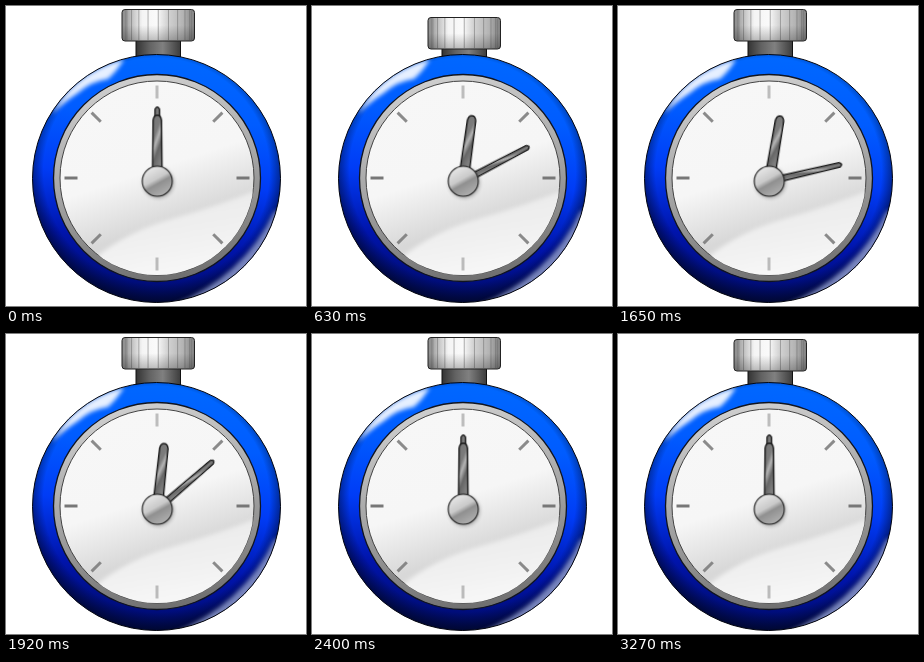
An HTML page for the animation above (3.3 s loop, 300x300 px).

```html
<!DOCTYPE html>
<html lang="en">
<head>
<meta charset="utf-8">
<title>Stopwatch</title>
<style>
  html, body { margin: 0; width: 100%; height: 100%; overflow: hidden; background: #fff; }
  svg { display: block; width: 100vw; height: 100vh; }
</style>
</head>
<body>
<svg viewBox="0 0 300 300">
  <defs>
    <linearGradient id="capMetal">
      <stop offset="0" stop-color="#8a8a8a"/>
      <stop offset=".14" stop-color="#c2c2c2"/>
      <stop offset=".28" stop-color="#f4f4f4"/>
      <stop offset=".48" stop-color="#fafafa"/>
      <stop offset=".62" stop-color="#d4d4d4"/>
      <stop offset=".84" stop-color="#b4b4b4"/>
      <stop offset="1" stop-color="#808080"/>
    </linearGradient>
    <linearGradient id="capShade" x2="0" y2="1">
      <stop offset=".5" stop-color="#000" stop-opacity="0"/>
      <stop offset="1" stop-color="#000" stop-opacity=".25"/>
    </linearGradient>
    <linearGradient id="neckMetal">
      <stop offset="0" stop-color="#333"/>
      <stop offset=".3" stop-color="#626262"/>
      <stop offset=".6" stop-color="#808080"/>
      <stop offset="1" stop-color="#3c3c3c"/>
    </linearGradient>
    <linearGradient id="blue" x1=".55" y1="0" x2=".45" y2="1">
      <stop offset="0" stop-color="#0068ff"/>
      <stop offset=".25" stop-color="#005cff"/>
      <stop offset=".5" stop-color="#003cf6"/>
      <stop offset=".75" stop-color="#0014ac"/>
      <stop offset="1" stop-color="#000a64"/>
    </linearGradient>
    <radialGradient id="rimShade" cy=".47" r=".53">
      <stop offset=".86" stop-color="#000620" stop-opacity="0"/>
      <stop offset="1" stop-color="#000620" stop-opacity=".75"/>
    </radialGradient>
    <linearGradient id="bezel" x1=".4" y1="0" x2=".6" y2="1">
      <stop offset="0" stop-color="#cfcfcf"/>
      <stop offset=".5" stop-color="#a4a4a4"/>
      <stop offset="1" stop-color="#6e6e6e"/>
    </linearGradient>
    <linearGradient id="face" x1=".35" y1="0" x2=".68" y2="1">
      <stop offset="0" stop-color="#f7f7f7"/>
      <stop offset=".45" stop-color="#f6f6f6"/>
      <stop offset=".72" stop-color="#d8d8d8"/>
    </linearGradient>
    <linearGradient id="sweep" x1=".35" y1="0" x2=".65" y2="1">
      <stop offset=".2" stop-color="#ebebeb"/>
      <stop offset=".8" stop-color="#f7f7f7"/>
    </linearGradient>
    <linearGradient id="hub" x1=".25" y1=".05" x2=".75" y2=".95">
      <stop offset="0" stop-color="#e8e8e8"/>
      <stop offset=".42" stop-color="#cacaca"/>
      <stop offset=".58" stop-color="#909090"/>
      <stop offset="1" stop-color="#b0b0b0"/>
    </linearGradient>
    <linearGradient id="handMetal" x2=".4" y2="1">
      <stop offset="0" stop-color="#747474"/>
      <stop offset=".35" stop-color="#7c7c7c"/>
      <stop offset=".48" stop-color="#b4b4b4"/>
      <stop offset=".65" stop-color="#666"/>
      <stop offset="1" stop-color="#8c8c8c"/>
    </linearGradient>
    <filter id="soft" x="-30%" y="-30%" width="160%" height="160%"><feGaussianBlur stdDeviation="2"/></filter>
    <clipPath id="caseClip"><circle cx="150.5" cy="172.5" r="124"/></clipPath>
    <clipPath id="faceClip"><circle cx="151" cy="172" r="97"/></clipPath>
  </defs>

  <g id="button">
    <path d="M130 32H174.500V62H130Z" fill="url(#neckMetal)" stroke="#111"/>
    <rect x="116" y="3.500" width="72.500" height="31.500" rx="3" fill="url(#capMetal)"/>
    <g id="ribs" stroke="#666"/>
    <rect x="116" y="3.500" width="72.500" height="31.500" rx="3" fill="url(#capShade)" stroke="#222"/>
  </g>

  <circle cx="150.500" cy="172.500" r="124" fill="url(#blue)"/>
  <circle cx="150.500" cy="172.500" r="124" fill="url(#rimShade)"/>
  <g clip-path="url(#caseClip)">
    <g filter="url(#soft)">
      <path d="M46 108Q68 66 118 53Q112 64 102 73Q86 75 72 87Q58 96 46 108Z" fill="#fff" opacity=".9"/>
      <path d="M166 300Q238 270 268 206L285 200V300Z" fill="#8c9bd0" opacity=".85"/>
    </g>
  </g>
  <circle cx="150.500" cy="172.500" r="124" fill="none" stroke="#05070f"/>

  <circle cx="151" cy="172" r="103.500" fill="url(#bezel)" stroke="#10141f" stroke-width="1.300"/>
  <circle cx="151" cy="172" r="97" fill="url(#face)" stroke="#444"/>
  <g clip-path="url(#faceClip)">
    <path d="M76 264Q112 228 165 213T256 182V290H76Z" fill="url(#sweep)" filter="url(#soft)"/>
  </g>
  <g id="ticks" stroke="#777"/>

  <g transform="translate(151.300 175.200)" stroke="#1c1c1c">
    <g id="minute">
      <path d="M-3 0L-2.300 -72Q0 -76.500 2.300 -72L3 0Z" fill="url(#handMetal)" stroke-width="1.400"/>
    </g>
    <g id="hour">
      <path d="M-4.800 0L-4.200 -61Q-3.500 -66 0 -66Q3.500 -66 4.200 -61L4.800 0Z" fill="url(#handMetal)" stroke-width="1.500"/>
    </g>
    <circle cx="1" cy="1.500" r="15" stroke="none" opacity=".35" filter="url(#soft)"/>
    <circle r="15" fill="url(#hub)" stroke-width="1.100"/>
  </g>
</svg>
<script>
  const FRAMES = 110;
  const DURATION = 3300;
  const byId = id => document.getElementById(id);

  function addLine(parent, x1, y1, x2, y2, width, opacity) {
    const line = document.createElementNS('http://www.w3.org/2000/svg', 'line');
    const attributes = { x1, y1, x2, y2, 'stroke-width': width, opacity };
    for (const name in attributes) line.setAttribute(name, attributes[name]);
    parent.append(line);
  }

  for (let i = 0; i < 11; i++) {
    const x = 152.25 - 33 * Math.cos(i * Math.PI / 10);
    addLine(byId('ribs'), x, 4, x, 34, 1, 0.5);
  }

  // The ticks fade towards the top and bottom of the dial.
  for (let i = 0; i < 8; i++) {
    const angle = i * Math.PI / 4;
    const point = r => [151 + r * Math.sin(angle), 172 - r * Math.cos(angle)];
    addLine(byId('ticks'), ...point(79.5), ...point(92.5), 3, 0.45 + 0.55 * Math.abs(Math.sin(angle)));
  }

  const startTime = document.timeline.currentTime;

  // Each step is [frame, value]; the whole loop advances in 30 ms ticks.
  // The small negative delay keeps samples clear of the tick boundaries.
  function play(id, steps, toTransform) {
    const keyframes = steps.map(([frame, value]) => ({
      offset: frame / FRAMES,
      transform: toTransform(value)
    }));
    byId(id).animate(keyframes, {
      delay: -3,
      duration: DURATION,
      iterations: Infinity,
      easing: `steps(${FRAMES})`
    }).startTime = startTime;
  }

  const rotate = degrees => `rotate(${degrees}deg)`;
  const sweep = max => [[0, 0], [27, max], [54, max], [80, 0], [110, 0]];

  play('minute', sweep(80), rotate);
  play('hour', sweep(10), rotate);
  play('button',
    [[0, 0], [17, 0], [22, 10], [27, 0], [100, 0], [105, 10], [110, 0]],
    y => `translateY(${y}px)`);
</script>
</body>
</html>
```
